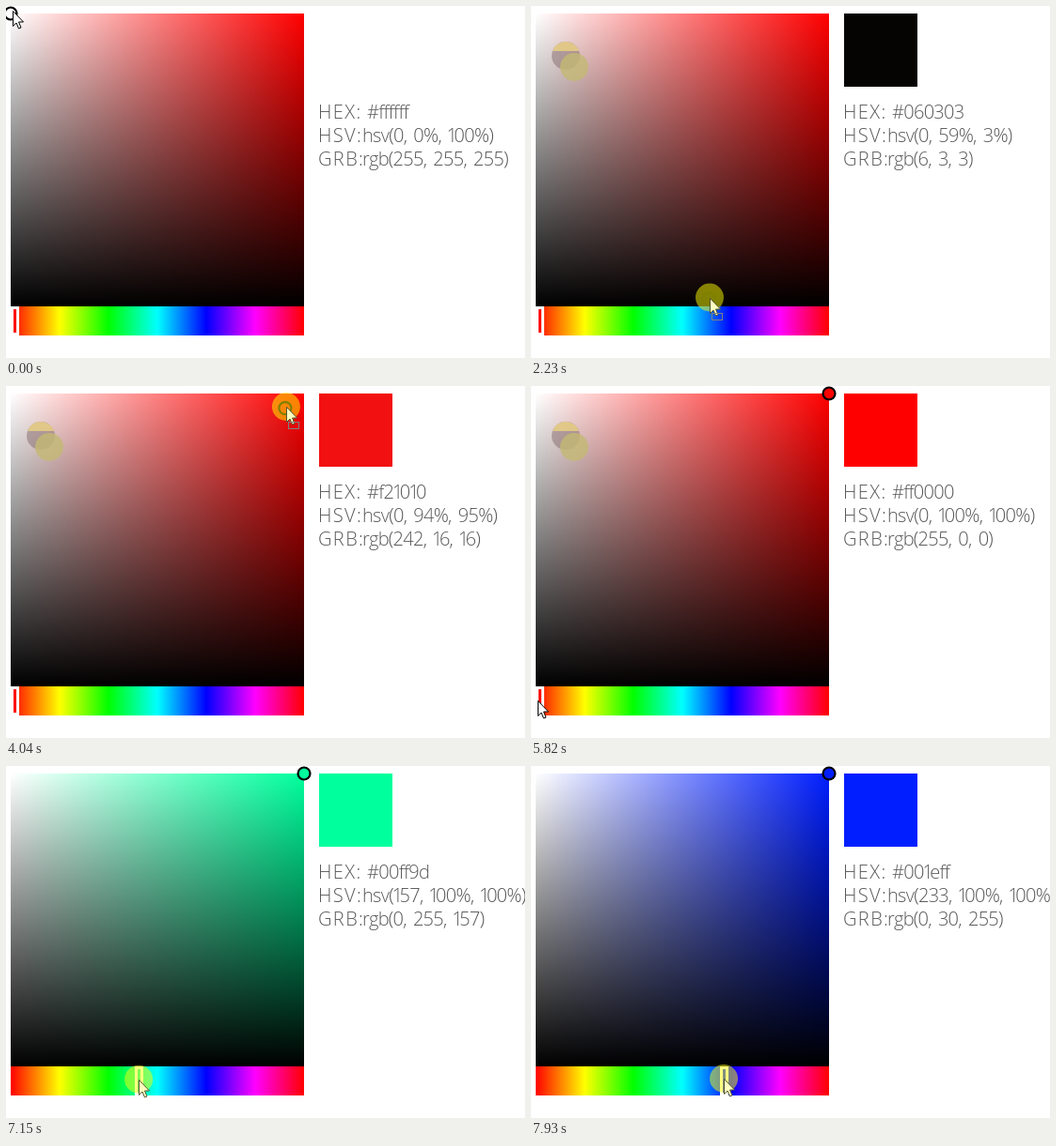
An HTML page with a canvas that plays this animation: 552 by 375 pixels, repeating every 8000 ms.

```html
<!DOCTYPE html>
<html lang="en">
<head>
<meta charset="utf-8">
<title>Colour picker</title>
<style>
html, body { margin: 0; width: 100%; height: 100%; overflow: hidden; background: #fff; }
#stage { position: relative; width: 552px; height: 375px; overflow: hidden; }
canvas { position: absolute; left: 0; top: 0; }
.row { position: absolute; left: 332px; height: 25px; color: #585858; white-space: nowrap;
  font: 300 20px/25px "Open Sans", "Noto Sans", sans-serif;
  font-variant-numeric: proportional-nums; }
.row b { font-weight: 300; letter-spacing: 1.4px; }
.row span { position: absolute; left: 47px; letter-spacing: -.7px; word-spacing: 2.5px; }
#hex { left: 52px; }
</style>
</head>
<body>
<div id="stage">
  <canvas id="view" width="552" height="375"></canvas>
  <div class="row" style="top:100px"><b>HEX:</b><span id="hex"></span></div>
  <div class="row" style="top:125px"><b>HSV:</b><span id="hsv"></span></div>
  <div class="row" style="top:150px"><b>GRB:</b><span id="rgb"></span></div>
</div>
<script>
const LOOP = 8000, STEP = 60;
const LEFT = 5, TOP = 8, SIZE = 312, BAR = 320, BAR_H = 31, KNOB = 9;
const PER_DEG = (SIZE - KNOB) / 360;

// Pointer strokes: each follows a cubic curve in both place and pace
const DOWN = { from: 550, to: 2470, x: [6.5, 42.3, 198.3, 196], y: [5, 67, 318.2, 323] };
const UP = { from: 2720, to: 4520, x: [196, 271, 291, 321], y: [323, 74, 6.3, 4] };
const OVER = { from: 4950, to: 5760, x: [321, 321, 0, 7], y: [4, 200, 355, 335] };
const SLIDE = { from: 5950, to: 8000, x: [7, 67.6, 184.3, 207.8], y: [335, 335, 333, 333] };
const STROKES = [DOWN, UP, OVER, SLIDE];

const $ = id => document.getElementById(id);
const ctx = $('view').getContext('2d');
const clamp = v => Math.min(1, Math.max(0, v));
const strokeAt = t => STROKES.filter(s => s.from <= t).pop();

// The screen refreshes every STEP ms, counted from the start of a stroke
function snap(t) {
  const from = strokeAt(t)?.from ?? 0;
  return from + Math.floor((t - from) / STEP) * STEP;
}

function bezier([a, b, c, d], u) {
  const w = 1 - u;
  return w * w * w * a + 3 * w * w * u * b + 3 * w * u * u * c + u * u * u * d;
}

function pointer(t) {
  const s = strokeAt(t) ?? DOWN;
  const u = clamp((t - s.from) / (s.to - s.from));
  return { x: bezier(s.x, u), y: bezier(s.y, u) };
}

function toRgb(h, s, v) {
  return [5, 3, 1].map(n => {
    const k = (n + h / 60) % 6;
    return Math.round(255 * v * (1 - s * clamp(Math.min(k, 4 - k))));
  });
}

const pure = hue => `hsl(${hue}, 100%, 50%)`;

function rect(color, x, y, w, h) {
  ctx.fillStyle = color;
  ctx.fillRect(x, y, w, h);
}

function disc(color, x, y, r, from = 0, to = Math.PI * 2) {
  ctx.fillStyle = color;
  ctx.beginPath();
  ctx.arc(x, y, r, from, to);
  ctx.fill();
}

function gradient(dx, dy, colors) {
  const g = ctx.createLinearGradient(LEFT, TOP, LEFT + dx, TOP + dy);
  colors.forEach((c, i) => g.addColorStop(i / (colors.length - 1), c));
  return g;
}

function drawField(hue) {
  rect(gradient(SIZE, 0, ['#fff', pure(hue)]), LEFT, TOP, SIZE, SIZE);
  rect(gradient(0, SIZE, ['rgba(0,0,0,0)', '#000']), LEFT, TOP, SIZE, SIZE);
}

function drawBar(hue) {
  const rainbow = Array.from({ length: 7 }, (_, i) => pure(i * 60));
  rect(gradient(SIZE, 0, rainbow), LEFT, BAR, SIZE, BAR_H);
  const x = LEFT + Math.round(hue * PER_DEG);
  rect('#fff', x, BAR, KNOB, BAR_H);
  rect(pure(hue), x + 3, BAR + 3, 3, BAR_H - 6);
}

// Stains the first drag leaves on the field
function drawStains() {
  disc('rgba(130,105,105,.5)', 37, 53, 15);
  disc('rgba(240,215,130,.75)', 37, 53, 15, Math.PI * 1.11, Math.PI * 1.89);
  disc('rgba(195,185,115,.8)', 46, 65, 15);
}

function drawArrow(x, y, pressed, dragging) {
  ctx.save();
  ctx.translate(Math.round(x) + .5, Math.round(y) + .5);
  ctx.strokeStyle = pressed ? '#553' : '#000';
  ctx.fillStyle = pressed ? '#ffffc0' : '#fff';
  ctx.beginPath();
  [[0, 0], [0, 16], [3.5, 12.5], [6, 18.5], [8.5, 17.5], [6, 11.5], [11, 11.5]]
    .forEach(p => ctx.lineTo(...p));
  ctx.closePath();
  ctx.fill();
  ctx.stroke();
  if (dragging) {
    ctx.strokeStyle = '#fff';
    ctx.strokeRect(2, 16, 11, 7);
    ctx.strokeStyle = '#000';
    ctx.setLineDash([1, 1]);
    ctx.strokeRect(2, 16, 11, 7);
  }
  ctx.restore();
}

function draw(time) {
  const t = snap(time);
  const p = pointer(t);
  const sliding = t >= SLIDE.from;
  const picking = t >= DOWN.from && t < OVER.from;
  const pressed = t >= 360 && t < OVER.from || sliding;

  const spot = pointer(Math.min(t, UP.to));
  const s = t < DOWN.from ? 0 : clamp((spot.x - 1 - LEFT) / SIZE);
  const v = 1 - clamp((spot.y + 1.6 - TOP) / SIZE);
  const hue = sliding ? Math.max(0, Math.round((p.x - 9) / PER_DEG)) : 0;
  const rgb = toRgb(hue, s, v);
  const color = `rgb(${rgb.join(', ')})`;

  rect('#fff', 0, 0, 552, 375);
  drawField(hue);
  drawBar(hue);
  if (t > 1000 && !sliding) drawStains();
  rect(color, 333, 8, 78, 78);

  const rx = LEFT + s * SIZE, ry = TOP + (1 - v) * SIZE;
  disc('#000', rx, ry, 7.6);
  disc(color, rx, ry, 5.4);
  if (pressed) disc('rgba(255,255,0,.5)', p.x, p.y, 15);
  drawArrow(p.x, p.y, pressed, picking);

  $('hex').textContent = '#' + rgb.map(c => c.toString(16).padStart(2, '0')).join('');
  $('hsv').textContent = `hsv(${hue}, ${Math.round(s * 100)}%, ${Math.round(v * 100)}%)`;
  $('rgb').textContent = color;
}

const begin = performance.now();
function tick() {
  draw((performance.now() - begin) % LOOP);
  requestAnimationFrame(tick);
}
tick();
</script>
</body>
</html>
```
